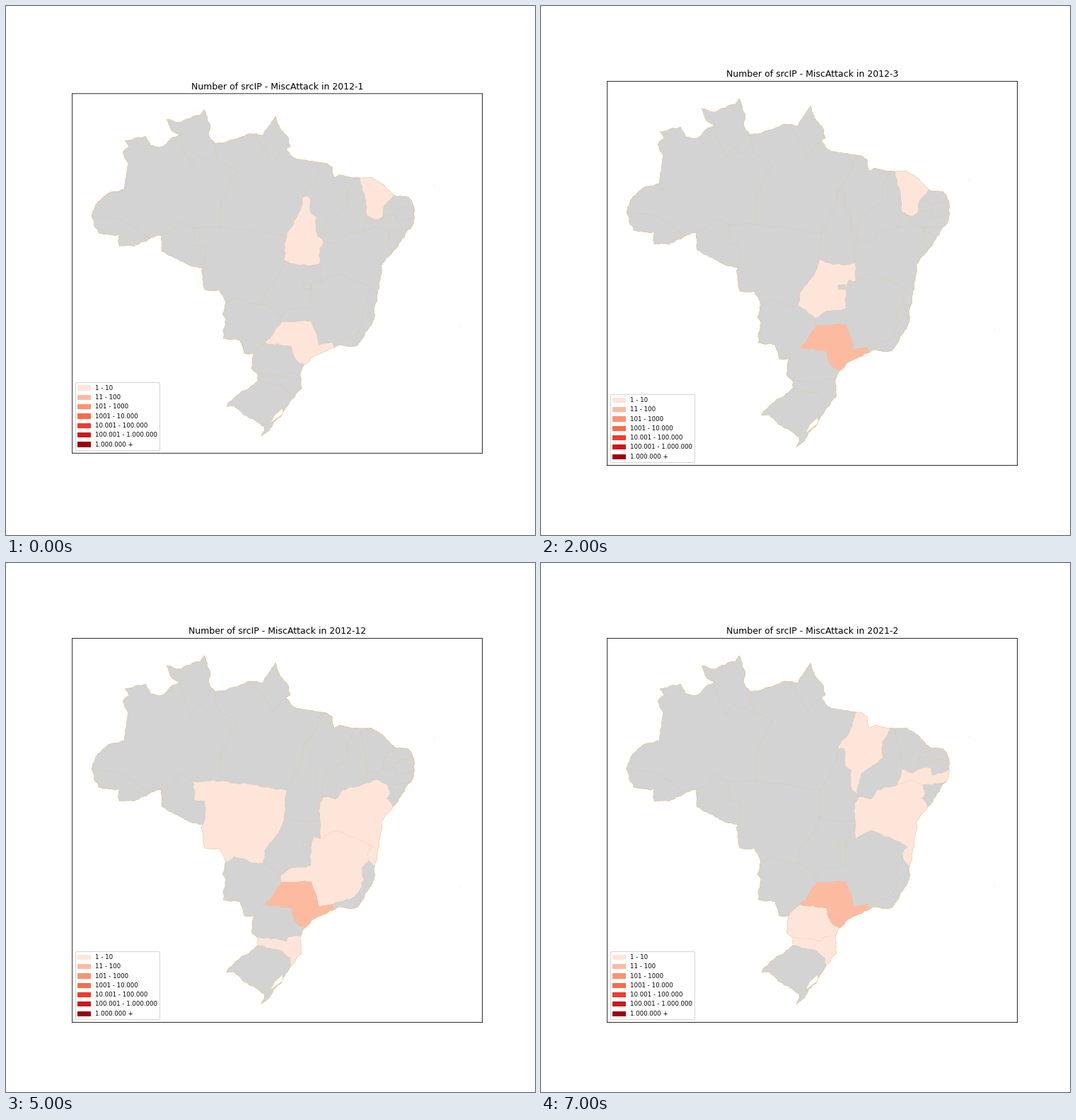
A matplotlib script for the animation above (8 s loop, 748x748 px).

```python
import math
import random
from itertools import combinations

import matplotlib.pyplot as plt
from matplotlib.animation import FuncAnimation
from matplotlib.patches import Patch, Polygon

SIZE = 748
LEFT, RIGHT, MIDDLE = 93.7, 673.5, 378.1
TALL, SHORT = 543, 508.4

REDS = ["#fee5d9", "#fcbba1", "#fc9272", "#fb6a4a", "#ef3b2c", "#cb181d", "#99000d"]
RANGES = ["1 - 10", "11 - 100", "101 - 1000", "1001 - 10.000",
          "10.001 - 100.000", "100.001 - 1.000.000", "1.000.000 +"]
GRAY = "lightgray"

# (month, states in the 1-10 class, states in the 11-100 class)
MONTHS = [
    ("2012-1", "TO CE SP", ""),
    ("2012-2", "GO MG SC", "SP"),
    ("2012-3", "GO CE", "SP"),
    ("2012-10", "GO CE PE BA", "SP"),
    ("2012-11", "PA MT CE PE MG PR SC", "SP"),
    ("2012-12", "MT BA MG SC", "SP"),
    ("2020-12", "SP", ""),
    ("2021-2", "MA PE BA PR SC", "SP"),
]

rng = random.Random(7)
joints = {}     # points where states meet, named by those states
borders = []    # (states on either side, points)


def ragged(a, b):
    """Fractal line from a to b, without its last point."""
    length = math.dist(a, b)
    if length < 3:
        return [a]
    k = rng.uniform(-0.12, 0.12) * min(length, 14) / length
    mid = ((a[0] + b[0]) / 2 - k * (b[1] - a[1]),
           (a[1] + b[1]) / 2 + k * (b[0] - a[0]))
    return ragged(a, mid) + ragged(mid, b)


def add_border(states, keys):
    line = [p for a, b in zip(keys, keys[1:]) for p in ragged(a, b)]
    borders.append((states, line + [keys[-1]]))


def points(xy):
    return list(zip(xy[::2], xy[1::2]))


pen, walker = (121, 292), "AC"


def coast(state, *xy):
    """Carry the outer edge on along one state."""
    global pen, walker
    joints[f"{walker} {state}"] = pen
    keys = [pen, *points(xy)]
    add_border([state], keys)
    pen, walker = keys[-1], state


def joint(states, x, y):
    joints[states] = (x, y)


def ring(state):
    """Join the borders of a state end to end."""
    parts = [line for names, line in borders if state in names]
    path = list(parts.pop(0))
    while parts:
        ways = [way for line in parts for way in (line, line[::-1])]
        best = min(ways, key=lambda way: math.dist(path[-1], way[0]))
        parts = [line for line in parts if line != best and line[::-1] != best]
        path += best[1:]
    return path


# Outer edge, clockwise from the far west
coast("AM", 131, 269, 147, 256, 167, 251, 173, 212, 165, 196, 174, 187, 168, 178,
      197, 171, 204, 185, 220, 187, 237, 172, 246, 168)
coast("RR", 234, 162, 227, 145, 247, 150, 275, 139, 280, 131, 288, 152, 286, 168, 296, 182)
coast("PA", 330, 173, 345, 167)
coast("AP", 364, 169, 381, 141, 388, 160, 400, 176, 402, 187, 396, 191)
coast("PA", 405, 202, 419, 207, 446, 211)
coast("MA", 461, 217, 464, 234, 472, 229, 495, 233)
coast("PI", 501, 234)
coast("CE", 517, 233, 540, 251, 549, 260)
coast("RN", 569, 263, 577, 278)
coast("PB", 577, 291)
coast("PE", 573, 309)
coast("AL", 559, 328)
coast("SE", 547, 345)
coast("BA", 530, 366, 528, 400, 521, 429)
coast("ES", 519, 450, 506, 473)
coast("RJ", 494, 488, 472, 486, 464, 490)
coast("SP", 440, 501, 422, 516)
coast("PR", 416, 528)
coast("SC", 418, 552, 403, 569)
coast("RS", 389, 594, 361, 624, 365, 609, 335, 591, 321, 578, 312, 579, 333, 556, 356, 541)
coast("SC", 356, 530)
coast("PR", 347, 521, 351, 498)
coast("MS", 337, 499, 331, 479, 307, 476, 311, 448, 306, 440, 311, 423)
coast("MT", 301, 403, 281, 403, 278, 370)
coast("RO", 258, 365, 221, 345, 220, 321)
coast("AM", 204, 325)
coast("AC", 181, 337, 160, 337, 160, 319, 131, 317, 121, 292)

# Inland points where three states meet
joint("AM RR PA", 296, 194)
joint("AM PA MT", 302, 309)
joint("AM MT RO", 265, 309)
joint("PA MA TO", 419, 263)
joint("PA MT TO", 397, 321)
joint("MT TO GO", 393, 358)
joint("MA TO PI", 447, 326)
joint("TO PI BA", 449, 331)
joint("TO GO BA", 444, 363)
joint("PI CE PE", 510, 291)
joint("PI PE BA", 503, 314)
joint("CE RN PB", 535, 275)
joint("CE PB PE", 533, 292)
joint("PE AL BA", 539, 313)
joint("AL SE BA", 541, 319)
joint("GO BA MG", 444, 390)
joint("BA MG ES", 513, 421)
joint("MT GO MS", 363, 424)
joint("GO MG MS", 388, 442)
joint("MS SP MG", 389, 451)
joint("MS PR SP", 366, 483)
joint("MG ES RJ", 498, 466)
joint("MG RJ SP", 462, 482)

# Main bends of the borders that are not straight
bends = {
    "AC AM": (163, 297),
    "AM RR": (252, 196, 262, 214, 273, 200, 285, 208),
    "AM PA": (303, 211, 327, 225, 305, 272),
    "AM RO": (238, 310, 248, 299),
    "MT RO": (282, 352, 281, 337, 266, 335),
    "AP PA": (358, 178, 376, 211),
    "MA PA": (438, 234),
    "PA TO": (418, 277, 408, 298),
    "MA TO": (428, 262, 430, 285, 439, 293, 440, 322),
    "MA PI": (483, 252, 484, 275, 453, 297),
    "CE PI": (509, 272),
    "BA PI": (466, 334, 475, 321),
    "BA TO": (443, 340),
    "GO TO": (405, 363, 425, 366),
    "GO MT": (386, 381, 366, 406),
    "CE PE": (527, 297),
    "PB PE": (554, 301, 551, 290),
    "PB RN": (558, 278, 550, 284, 547, 275),
    "BA PE": (524, 306),
    "AL PE": (552, 314),
    "BA SE": (538, 333, 543, 327),
    "BA MG": (467, 378, 495, 389, 518, 401, 511, 410),
    "GO MG": (436, 387, 431, 402, 431, 428, 405, 431),
    "ES MG": (503, 431, 506, 447),
    "MG RJ": (487, 475),
    "MG SP": (431, 450, 441, 478, 443, 487),
    "MS MT": (322, 415, 343, 422),
    "PR SP": (409, 507, 403, 488),
    "PR SC": (400, 529, 396, 535, 370, 530),
    "RS SC": (402, 558, 391, 549),
}

# Two states share a border when they share two joints
names = sorted({name for key in joints for name in key.split()})
for a, b in combinations(names, 2):
    ends = [p for key, p in joints.items() if {a, b} <= set(key.split())]
    if len(ends) == 2:
        add_border([a, b], [ends[0], *points(bends.get(f"{a} {b}", ())), ends[1]])

LAGOON = [(391, 582), (392, 590), (374, 604), (380, 592)]
DISTRICT = [(420, 394), (431, 394), (431, 401), (420, 401)]
ISLETS = [(605, 246), (641, 457)]


def frame_box(height):
    bottom = SIZE - MIDDLE - height / 2
    return [v / SIZE for v in (LEFT, bottom, RIGHT - LEFT, height)]


fig = plt.figure(figsize=(10, 10), dpi=SIZE / 10, facecolor="white")
ax = fig.add_axes(frame_box(TALL))
ax.set(xlim=(LEFT, RIGHT), ylim=(MIDDLE + TALL / 2, MIDDLE - TALL / 2), xticks=[], yticks=[])
for spine in ax.spines.values():
    spine.set_snap(False)
title = ax.set_title("")

states = {}
for name in names:
    shape = ring(name)
    ax.add_patch(Polygon(shape, fc=GRAY, ec=GRAY, lw=0.3, zorder=1))
    states[name] = ax.add_patch(Polygon(shape, fc=GRAY, lw=0, zorder=2))

ax.add_patch(Polygon(DISTRICT, fc=GRAY, ec="orange", lw=0.08, zorder=3))
ax.add_patch(Polygon(LAGOON, fc="white", ec="orange", lw=0.2, zorder=3))
for sides, line in borders:
    ax.plot(*zip(*line), color="orange", lw=0.2 if len(sides) == 1 else 0.08, zorder=4)
ax.plot(*zip(*ISLETS), ls="", marker="o", ms=0.6, mew=0, color="tan")

handles = [Patch(color=c, label=r) for c, r in zip(REDS, RANGES)]
ax.legend(handles=handles, loc="lower left", fontsize="small").set_zorder(5)


def draw(i):
    month, low, high = MONTHS[i]
    ax.set_position(frame_box(SHORT if i == 0 else TALL))
    title.set_text(f"Number of srcIP - MiscAttack in {month}")
    for name, patch in states.items():
        patch.set_facecolor(REDS[0] if name in low.split()
                            else REDS[1] if name in high.split() else GRAY)
    return [title, *states.values()]


anim = FuncAnimation(fig, draw, frames=len(MONTHS), interval=1000, repeat=True)
plt.show()
```
